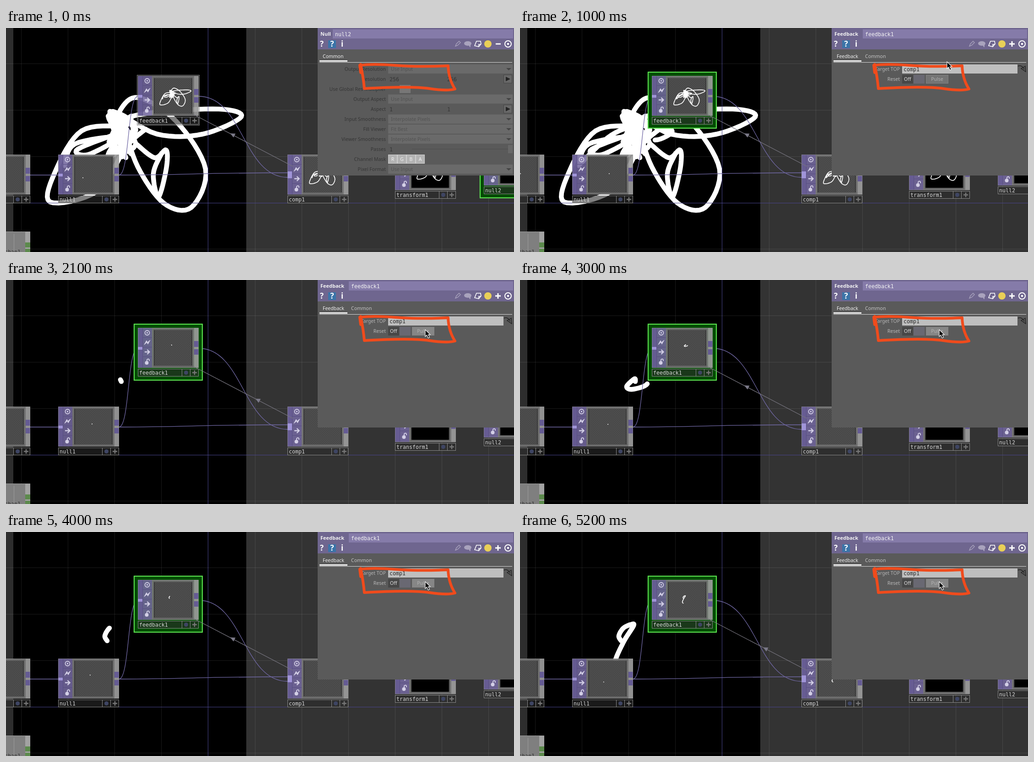
An HTML page for the animation above (5300 ms loop, 1110 by 492 pixels).

```html
<!DOCTYPE html>
<html lang="en">
<head>
<meta charset="utf-8">
<title>Node network</title>
<style>
html, body { margin: 0; width: 100%; height: 100%; overflow: hidden; background: #333; }
svg { display: block; }
text { font: 10.5px "Noto Sans", "Open Sans", sans-serif; white-space: pre; }
.mono { font: 11.6px "DejaVu Sans Mono", monospace; }
.bold { font-weight: 700; font-size: 11px; }
.big { font-weight: 700; font-size: 17px; }
.end { text-anchor: end; }
.mid { text-anchor: middle; }
.wire { fill: none; stroke: #7068a4; stroke-width: 1.3; }
.pen { fill: none; stroke: #fff; stroke-width: 10.5; stroke-linecap: round; stroke-linejoin: round; }
</style>
</head>
<body>
<svg id="stage" width="1110" height="492" viewBox="0 0 1110 492"></svg>
<script>
const LOOP = 5300, STEP = 100, SCALE = 0.161;
const PANEL_AT = 200, CLEAR_AT = 2000, RESTART_AT = 3700;

// Finished scribble: a few points per loop, joined by smooth curves
const rightLoop = [[245,225], [250,180], [290,153], [372,205], [436,310], [405,394], [345,385], [288,305], [258,215]];
const ear = [[225,250], [252,205], [320,186], [465,178], [514,195], [430,233], [330,233], [228,184], [262,285]];
const leftLoop = [[250,215], [165,226], [110,310], [96,382], [200,358], [262,262], [305,222]];
const needle = [[285,255], [325,285], [350,268], [350,310], [333,371], [322,320], [340,275]];
const lobe = [[262,225], [157,266], [180,278], [245,240], [150,255], [128,302]];
const tangle = Array.from({ length: 15 }, (_, i) =>
  [254 + 31 * Math.sin(i * 2.3), 233 + 50 * Math.cos(i * 1.9)]);

// Live pen strokes: time, x, y
const firstPen = [[0,128,302], [270,200,235], [400,264,215], [750,332,225], [1000,295,246], [2000,250,222]];
const secondPen = [[2000,250,219], [2100,252,223], [2300,250,217], [2600,233,234], [2750,246,240],
  [3000,278,228], [3400,270,200], [3700,221,239]];
const thirdPen = [[3700,221,239], [3850,216,228], [4000,226,211], [4200,243,203], [4400,248,206],
  [4800,226,242], [5100,207,288], [5200,220,305], [5300,230,300]];
const strokes = [firstPen, secondPen, thirdPen];

const pointer = [[300,352,172], [400,363,163], [500,364,163], [1000,933,74], [1400,916,109]];

// Smooth point on segment i at fraction f
function spline(pts, i, f) {
  const at = k => pts[Math.max(0, Math.min(pts.length - 1, k))];
  const [a, b, c, d] = [at(i - 1), at(i), at(i + 1), at(i + 2)];
  return [0, 1].map(n => b[n] + 0.5 * f * (c[n] - a[n] +
    f * (2 * a[n] - 5 * b[n] + 4 * c[n] - d[n] + f * (3 * (b[n] - c[n]) + d[n] - a[n]))));
}

function curve(pts, upTo = pts.length - 1) {
  const out = [pts[0]];
  for (let u = 0.125; u <= upTo; u += 0.125) {
    const i = Math.min(Math.floor(u), pts.length - 2);
    out.push(spline(pts, i, u - i));
  }
  const last = Math.min(Math.floor(upTo), pts.length - 2);
  out.push(spline(pts, last, upTo - last));
  return 'M' + out.map(p => p[0].toFixed(1) + ' ' + p[1].toFixed(1)).join('L');
}

// Fractional key index at time t
function progress(keys, t) {
  if (t <= keys[0][0]) return 0;
  const i = keys.findIndex(k => k[0] > t) - 1;
  if (i < 0) return keys.length - 1;
  return i + (t - keys[i][0]) / (keys[i + 1][0] - keys[i][0]);
}

const doodlePath = [rightLoop, ear, leftLoop, needle, lobe, tangle].map(p => curve(p)).join('');

const rect = (x, y, w, h, fill, more = '') =>
  `<rect x="${x}" y="${y}" width="${w}" height="${h}" fill="${fill}" ${more}/>`;
const path = (d, stroke, width = 1, fill = 'none') =>
  `<path d="${d}" stroke="${stroke}" stroke-width="${width}" fill="${fill}"/>`;
const text = (x, y, s, fill, cls = '') =>
  `<text x="${x}" y="${y}" fill="${fill}" class="${cls}">${s}</text>`;
const ring = (x, y, r, color, w) =>
  `<circle cx="${x}" cy="${y}" r="${r}" fill="none" stroke="${color}" stroke-width="${w}"/>` +
  `<circle cx="${x}" cy="${y}" r="${r / 3}" fill="${color}"/>`;

function grid() {
  let out = '';
  for (let i = 0; i < 11; i++) {
    const x = 33.5 + Math.round(i * 102.1);
    out += path(`M${x} 0V492`, i === 4 ? '#48448a' : 'rgba(255,255,255,.1)');
  }
  for (let i = 0; i < 5; i++) {
    const y = 78.5 + i * 102 - (i > 3 ? 1 : 0);
    out += path(`M0 ${y}H1110`, i === 3 ? '#48448a' : 'rgba(255,255,255,.1)');
  }
  return out;
}

function icons() {
  const c = '#d3cfe6';
  return ring(20.5, 11, 5, c, 1.8) +
    path('M14 37L19 28L21 32L27 27L22 36L20 32Z', c, 1, c) +
    path('M15 53H25M20.5 48L25.5 53L20.5 58', c, 2.4) +
    `<circle cx="19.5" cy="77" r="4" fill="${c}"/>` + path('M20 74V70Q23 67 25 70V73', c, 1.8);
}

function node(x, y, name, thumb, view, inputs = 1) {
  const img = view ? `<use href="#${view}" transform="translate(${36 - 16 * SCALE} 2.3) scale(${SCALE})"/>` : '';
  return `<g transform="translate(${x} ${y})">` +
    rect(0, 0, 31, 88, '#73689f', 'fill-opacity=".88"') +
    rect(0, 0, 10, 88, '#655b94', 'fill-opacity=".7"') +
    path('M10.5 0V88M10 21.5H31M10 42.5H31M10 63.5H31', '#574e82') +
    rect(0, inputs > 1 ? 37 : 42, 10, inputs > 1 ? 15 : 6, '#a094d8') + icons() +
    rect(31, 0, 92, 88, '#7c7c7c', 'fill-opacity=".9"') +
    rect(34, 3, 86, 83, '#646464') + rect(36, 5, 82, 78, thumb) +
    path('M36 5V83M118 5V83', '#303030', 1.4) + img +
    rect(123, 0, 10, 88, '#9d9d9d', 'fill-opacity=".92"') +
    rect(123, 29, 10, 13, '#655b94') + rect(123, 47, 10, 12, '#655b94') +
    rect(0.5, 0.5, 132, 87, 'none', 'stroke="#969696" stroke-opacity=".55"') +
    rect(0.5, 90.5, 132, 16, '#2c2c2c', 'fill-opacity=".6" stroke="#8a8a8a"') +
    path('M96.5 90V107M114.5 90V107', '#8a8a8a') +
    `<circle cx="105.5" cy="98.5" r="4.5" fill="#3e4563"/>` +
    path('M119 98.5H129M124 93.5V103.5', '#777', 2.4) +
    text(3, 103, name, '#d8d8d8', 'mono') + '</g>';
}

const frame = (id, x, y) =>
  rect(x - 8, y - 8, 149, 123, '#004c00', `id="${id}" stroke="#5be04f" stroke-width="2.2"`);

function header(title, name, fieldX, sign) {
  const grey = '#a9a3bd';
  return rect(681, 0, 429, 324, '#5a5a5a') + rect(681, 0, 429, 47, '#6f668f') +
    rect(fieldX, 3, 1108 - fieldX, 20, '#857ba9') +
    text(687, 17, title, '#f2f2f2', 'bold') + text(fieldX + 5, 18, name, '#f4f4f4', 'mono') +
    text(686, 41, '?', '#fff', 'big') + rect(704, 27, 17, 17, '#3b74a8') +
    text(712.5, 41, '?', '#fff', 'big mid') + text(732, 41, 'i', '#fff', 'big') +
    path('M982 40L984 35L990 29L993 32L987 38Z', grey, 1.4) +
    `<ellipse cx="1009" cy="34" rx="8" ry="5" fill="${grey}"/>` + path('M1011 37L1014 42L1015 36Z', grey, 1, grey) +
    path('M1024 39L1028 29H1037L1038 35L1033 41Z', '#fff', 1.6) + path('M1033 41V36H1038', '#fff', 1.5) +
    `<circle cx="1053" cy="35" r="8" fill="#e9cf57"/>` +
    path(sign === '+' ? 'M1069 35H1081M1075 29V41' : 'M1070 35H1081', '#fff', 2.8) +
    ring(1097, 35, 7, '#fff', 2) + path('M685 75.5H1106', '#d8d8d8');
}

function feedbackPanel() {
  return header('Feedback', 'feedback1', 749, '+') +
    path('M685 72.5H746', '#f0f0f0', 3) +
    text(692, 66, 'Feedback', '#f0f0f0') + text(754, 66, 'Common', '#c4c4c4') +
    text(830, 94, 'Target TOP', '#b4b4b4', 'end') + rect(835, 80, 252, 20, '#bfbfbf') +
    text(838, 95, 'comp1', '#2a2a2a', 'mono') +
    path('M1088 84Q1096 80 1102 91M1095 89L1105 96L1104 84Z', '#1c1c1c', 1.2) +
    text(830, 116, 'Reset', '#b8b8b8', 'end') + rect(835, 103, 24, 19, '#474747') +
    text(839, 116, 'Off', '#e2e2e2') + rect(860, 103, 24, 19, '#696872') +
    rect(887.5, 103.5, 48, 18, '#747474', 'id="pulse" stroke="#828282"') +
    text(911.5, 116, 'Pulse', '#b2b2b2', 'mid');
}

function commonPanel() {
  const dim = '#353535', faint = '#434343';
  const rows = [['Output Resolution', 'Use Input'], ['Resolution'], ['Use Global Res Multiplier'],
    ['Output Aspect', 'Use Input'], ['Aspect'], ['Input Smoothness', 'Interpolate Pixels'],
    ['Fill Viewer', 'Fit Best'], ['Viewer Smoothness', 'Interpolate Pixels'], ['Passes'],
    ['Channel Mask'], ['Pixel Format', 'Use Input']];
  let out = header('Null', 'null2', 714, '-') + path('M685 72.5H746', '#f0f0f0', 3) +
    text(692, 66, 'Common', '#f0f0f0');
  rows.forEach(([label, value], i) => {
    const y = 90 + i * 22;
    out += text(830, y + 4, label, dim, 'end');
    if (value) out += rect(835, y - 10, 272, 20, '#6a6a6a') + text(841, y + 4, value, '#525252') +
      path(`M1093 ${y - 2}H1104L1098.5 ${y + 3}Z`, 'none', 0, faint);
  });
  for (const [y, v] of [[112, '256'], [178, '1']]) {
    out += text(838, y + 5, v, dim, 'mono') + text(964, y + 5, v, dim, 'mono') +
      rect(1087.5, y - 9, 18, 18, '#686868', 'stroke="#454545"') +
      path(`M1092 ${y - 5}V${y + 5}L1102 ${y}Z`, 'none', 0, '#242424');
  }
  out += rect(860, 125, 24, 18, '#777') + text(838, 271, '1', dim, 'mono') +
    path('M887 266H1098', '#4c4c4c') + rect(1097, 257, 10, 18, '#686868');
  [...'RGBA'].forEach((c, i) => {
    out += rect(835.5 + i * 20, 278.5, 19, 19, '#b3b3b3', 'stroke="#cfcfcf"') +
      text(845 + i * 20, 292, c, '#f2f2f2', 'mid');
  });
  return out;
}

const stage = document.getElementById('stage');
stage.innerHTML = `<defs>
  <pattern id="check" width="4" height="4" patternUnits="userSpaceOnUse">
    ${rect(0, 0, 4, 4, '#565656') + rect(0, 0, 2, 2, '#404040') + rect(2, 2, 2, 2, '#404040')}
  </pattern>
  <path id="ink" class="pen"/>
  <circle id="dot" r="6" fill="#fff"/>
  </defs>` +
  rect(0, 0, 1110, 492, '#333') + rect(0, 0, 16, 492, '#2d2d2d') + rect(16, 0, 509, 492, '#000') +
  '<use href="#ink"/>' + grid() +
  `<g class="wire"><path d="M53 323H114"/><path d="M247 323C380 323 430 318 615 318"/>
   <path d="M247 323C270 323 265 150 288 150"/><path d="M421 150C518 150 518 328 615 328"/></g>` +
  frame('pickA', 288, 105) + frame('pickB', 1044, 258) +
  rect(286.5, 103.5, 136, 110, 'none', 'id="hover" stroke="#8c8c8c"') +
  node(-80, 278, '', 'url(#check)', 'dot') + node(114, 278, 'null1', 'url(#check)', 'dot') +
  node(288, 105, 'feedback1', 'url(#check)', 'ink') + node(615, 278, 'comp1', 'url(#check)', 'ink', 2) +
  node(850, 268, 'transform1', '#000', 'ink') + node(1044, 258, 'null2', '#000') +
  rect(0, 447, 42, 45, '#7f7f7f') + rect(42, 447, 11, 45, '#a2a2a2') + path('M0 447.5H53', '#989898') +
  path('M17.5 452V492', '#9c9c9c') + rect(42, 471, 11, 11, '#5c8a4c') + rect(42, 485, 11, 7, '#5c8a4c') +
  text(-3, 496, 'chan1', '#303030', 'mono') +
  path('M410 190L627 304', '#77757f', 1.2) +
  '<path id="arrow" d="M-6 -4L5.5 -3.6L1 5Z" fill="#7b7988"/>' +
  `<g id="common">${commonPanel()}</g><g id="feedback">${feedbackPanel()}</g>` +
  `<path d="M775 98L773 82Q800 78 850 82T966 83Q967 112 981 134Q965 139 925 133T783 133Q781 110 775 80"
    fill="none" stroke="#f04b1c" stroke-width="6" stroke-linecap="round" stroke-linejoin="round"/>` +
  '<path id="cursor" d="M0 0V15L3.5 12L6.5 18.5L9.5 17L6.5 11H11Z" fill="#000" stroke="#fff" stroke-width="1.1"/>';

const el = id => document.getElementById(id);
const show = (id, on) => el(id).setAttribute('visibility', on ? 'visible' : 'hidden');
const move = (id, x, y) => el(id).setAttribute('transform', `translate(${x} ${y})`);

function draw(t) {
  const n = t < CLEAR_AT ? 0 : t < RESTART_AT ? 1 : 2;
  const keys = strokes[n], pts = keys.map(k => k.slice(1));
  const u = progress(keys, t), i = Math.min(Math.floor(u), pts.length - 2);
  el('ink').setAttribute('d', (n ? '' : doodlePath) + curve(pts, u));
  move('dot', ...spline(pts, i, u - i));

  const picked = t >= PANEL_AT;
  show('common', !picked);
  show('pickB', !picked);
  show('hover', !picked);
  show('feedback', picked);
  show('pickA', picked);
  el('pickA').setAttribute('fill', t < 700 ? '#1b6a22' : '#004c00');
  el('pulse').setAttribute('fill', t >= 1400 ? '#868686' : '#747474');

  // The link arrow runs the same stretch twice a second
  const phase = (t + 400) % 500 / 100;
  const x = 551 - 13.75 * phase;
  move('arrow', x, 235 + (x - 495) * 0.53);

  const p = progress(pointer, t), k = Math.min(Math.floor(p), pointer.length - 2);
  const [a, b] = [pointer[k], pointer[k + 1]];
  show('cursor', t >= pointer[0][0]);
  move('cursor', a[1] + (b[1] - a[1]) * (p - k), a[2] + (b[2] - a[2]) * (p - k));
}

const start = performance.now();
function tick() {
  const t = (performance.now() - start) % LOOP;
  draw(Math.floor(t / STEP) * STEP);
  requestAnimationFrame(tick);
}
tick();
</script>
</body>
</html>
```
